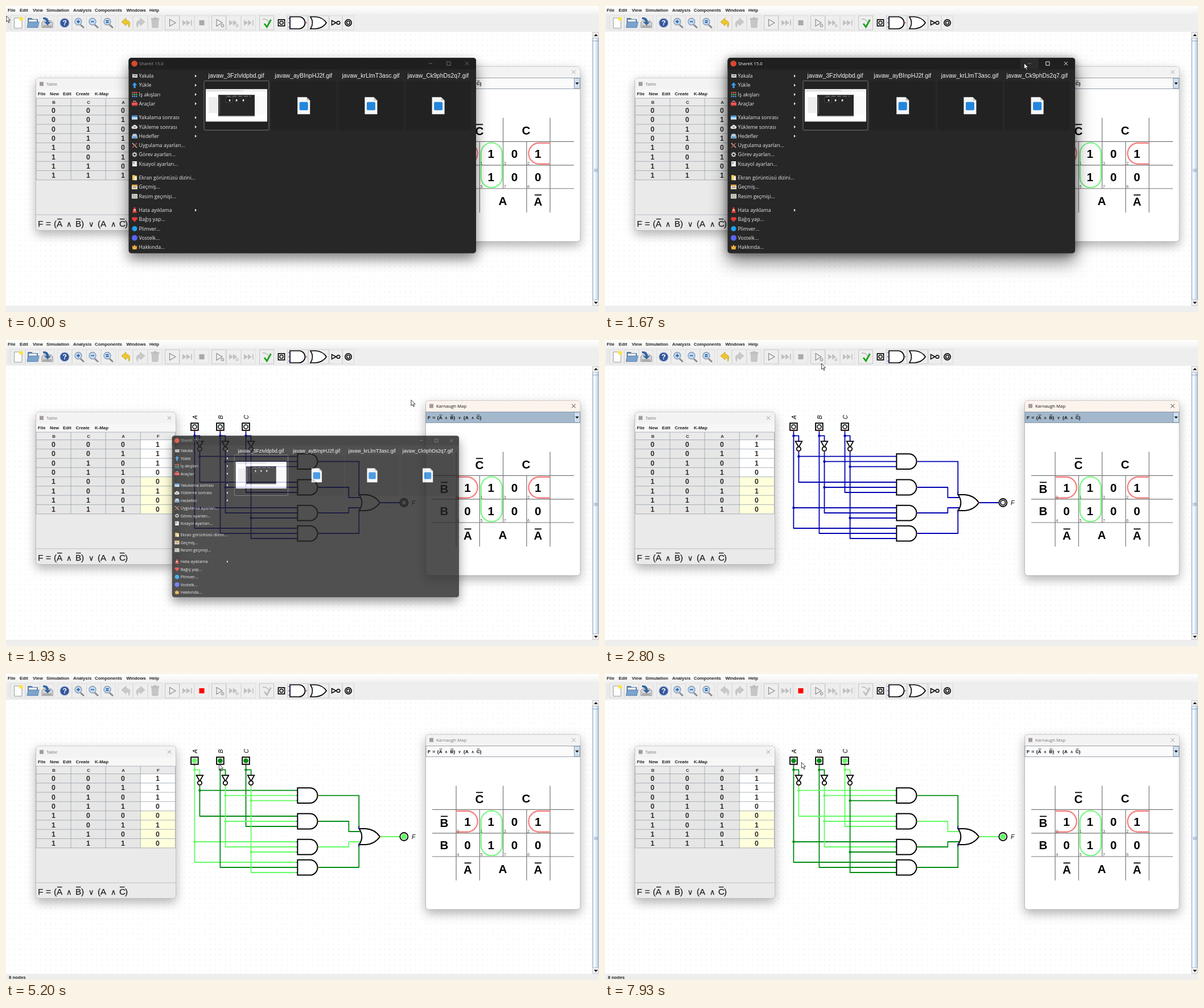
Animation, 1042 px wide and 538 px high, one loop 8 s. Source, as an HTML page:

```html
<!DOCTYPE html>
<html lang="en">
<head>
<meta charset="utf-8">
<title>Logic circuit simulation</title>
<style>
html,body{margin:0;width:100%;height:100%;overflow:hidden;background:#fff}
svg{display:block;width:100vw;height:100vh;font-family:"Liberation Sans","DejaVu Sans",sans-serif}
.b{font-weight:bold}
.u{font-family:"Open Sans","Noto Sans",sans-serif}
.m{text-anchor:middle}
.i{font-style:italic}
.win{filter:drop-shadow(0 7px 9px rgba(0,0,0,.3))}
#big .win{filter:drop-shadow(0 10px 11px rgba(0,0,0,.5))}
#big.active .win{filter:drop-shadow(0 1px 7px rgba(0,0,0,.4)) drop-shadow(0 14px 15px rgba(0,0,0,.5))}
</style>
</head>
<body>
<svg id="stage" viewBox="0 0 1042 538"></svg>
<script>
const text = (x, y, size, s, cls = '', more = '') =>
  `<text x="${x}" y="${y}" font-size="${size}" class="${cls}" ${more}>${s}</text>`;
const rect = (x, y, w, h, fill, more = '') =>
  `<rect x="${x}" y="${y}" width="${w}" height="${h}" fill="${fill}" ${more}/>`;
const path = (d, fill, stroke = 'none', w = 1, more = '') =>
  `<path d="${d}" fill="${fill}" stroke="${stroke}" stroke-width="${w}" ${more}/>`;
const line = (d, stroke, w = 1, more = '') => path(d, 'none', stroke, w, more);
const circ = (x, y, r, fill, stroke = 'none', w = 1, more = '') =>
  `<circle cx="${x}" cy="${y}" r="${r}" fill="${fill}" stroke="${stroke}" stroke-width="${w}" ${more}/>`;
const range = n => [...Array(n).keys()];
const cross = (x, y, id) => line(`M${x - 3.3} ${y - 3.3}l6.6 6.6m0-6.6l-6.6 6.6`, '#999', .9, `id="${id}"`);

// ---- main window ----
function menuBar(items, y) {
  return items.map(([x, s]) => text(x, y, 7.85, s, 'b', 'fill="#222"')).join('');
}

function toolbar() {
  const g = '#c0c0c0', blue = '#3465a4';
  const frame = (x, c, w = 25) => rect(x - w / 2, 17, w, 25, 'none', `stroke="${c}" stroke-width=".8"`);
  const zoom = (x, sign) => line(`M${x + 2} 33l6 5.5`, '#8a8a8a', 3) +
    circ(x - 2, 27.5, 6, '#c2dcf7', '#8a97a8', 1.3) + line(sign, blue, 1.8);
  const ff = x => path(`M${x - 8} 24.5l7 5-7 5zm7 0l7 5-7 5z`, g);
  let s = '';
  for (const x of [21, 47, 72, 103, 129, 154, 180, 210, 236, 262, 318, 344, 400, 426]) s += frame(x, '#dadada');
  for (const x of [292, 374, 458]) s += frame(x, '#bcbcbc');
  for (const y of range(12)) s += line(`M3 ${18 + y * 2}h5`, '#cfcfcf', .7, 'stroke-dasharray="1 1"');
  s += path('M14.5 21H28V39H14.5z', '#fdfdfd', '#9a9a9a') + circ(26.5, 22.5, 3.6, '#fbe44c');
  s += path('M38 21h7l2 2h9v14H38z', '#5b7fa8') + path('M40 24h14v8H40z', '#eee') +
    path('M37 38l2-10h19l-2 10z', '#7ba3cc', '#4a74a8', .8);
  s += path('M63 29l3-3h13l3 3v9H63z', '#d4d4d4', '#8b8b8b') + rect(65, 34, 15, 3, '#aaa') +
    path('M65 20q10-1 10 8h4l-6 6-6-6h4q0-4-6-5z', blue);
  s += circ(103, 29.7, 8.2, '#35569b', '#c0cce3', 1.3) + text(103, 34.2, 12.5, '?', 'b m', 'fill="#fff"');
  s += zoom(129, 'M124 27.5h6m-3-3v6') + zoom(154, 'M149 27.5h6') + zoom(180, 'M175.5 26h5m-5 3h5');
  s += path('M203 28l8-7v4q10 1 5 13 0-7-5-7v4z', '#efc62c', '#b99a20', .7, 'id="undo"');
  s += path('M244 28l-8-7v4q-10 1-5 13 0-7 5-7v4z', '#c9c9c9', '#b8b8b8', .7);
  s += path('M256 24h12l-1 14h-10zM255 21.5h14v2h-14zM260 20h4v2h-4z', '#c6c6c6', '#b2b2b2', .6);
  s += line('M287.5 23.5L298 29.5 287.5 35.5z', '#888', 1.1) + ff(318) + rect(325, 24.5, 1.8, 10, g);
  s += rect(339.5, 25, 9, 9, '#aaa', 'id="stop"');
  s += line('M370 23.5l10 6-10 6z', '#888', 1.1) + circ(380.5, 34.5, 2.4, '#ddd', '#888', 1);
  s += ff(400) + circ(406, 34.5, 2.2, '#ddd', g) + ff(426) + line('M434 24.5v10', g, 1.6);
  s += line('M451 23h4q5 1 7 6', '#999', 1) + line('M454 31l4.5 6 7-13', '#14a414', 2.8, 'id="check"');
  s += rect(478.5, 24, 11, 11, '#fff', 'stroke="#000" stroke-width="1.7"') + circ(484, 29.5, 3, '#eee', '#000', 1.3);
  s += frame(512.5, '#c4c4c4', 36) + path('M499 19H515A10.5 10.5 0 0 1 515 40H499z', '#fff', '#000', 1.7);
  s += line('M496 22h3m-3 7.5h3m-3 7.5h3', '#22b', 1) + line('M526 29.5h3', '#a22', 1);
  s += frame(549, '#c4c4c4', 36) + path('M535 19H544Q557 20 563 29.5 557 39 544 40H535Q542 29.5 535 19z', '#fff', '#000', 1.7);
  s += frame(579.5, '#d4d4d4', 22) + path('M572.5 25.5L580 29.5l-7.5 4z', '#fff', '#000', 1.5) + circ(584, 29.5, 2.8, '#fff', '#000', 1.5);
  s += frame(601.5, '#d4d4d4', 20) + circ(601.5, 29.5, 5.6, '#fff', '#000', 1.7) + circ(601.5, 29.5, 2.9, '#eee', '#000', 1.5);
  return s;
}

function mainWindow() {
  let s = `<defs>
    <linearGradient id="bar" x2="0" y2="1"><stop stop-color="#fff"/><stop offset="1" stop-color="#f2f2f2"/></linearGradient>
    <linearGradient id="thumb"><stop stop-color="#dde8f3"/><stop offset=".3" stop-color="#fff"/><stop offset=".6" stop-color="#dde8f3"/><stop offset="1" stop-color="#b8cfe5"/></linearGradient>
    <pattern id="dots" x="5.8" y="5.3" width="9.03" height="9.03" patternUnits="userSpaceOnUse"><rect width="1" height="1" fill="#d2d2d2"/></pattern>
  </defs>`;
  s += rect(0, 0, 1042, 538, '#fff') + rect(0, 46, 1030, 481, 'url(#dots)');
  s += rect(0, 0, 1042, 14, 'url(#bar)') + rect(0, 14, 1042, 31.5, '#eee');
  s += menuBar([[3, 'File'], [24, 'Edit'], [47, 'View'], [71, 'Simulation'], [118, 'Analysis'],
    [156, 'Components'], [211.5, 'Windows'], [252, 'Help']], 9.8);
  s += toolbar();
  s += rect(0, 527, 1042, 11, '#eee') + text(5, 535.8, 7.85, '8 nodes', 'b', 'id="status" fill="#222"');
  s += rect(1030, 46, 12, 481, '#eee') + rect(1031, 56.5, 10, 460, 'url(#thumb)', 'stroke="#7a93b5" stroke-width=".8"');
  for (const y of [46.5, 516.5]) s += rect(1031, y, 10, 10, '#f4f4f4', 'stroke="#aab" stroke-width=".6"');
  s += path('M1033 53h7l-3.5-4zM1033 520h7l-3.5 4z', '#222');
  return s + line('M1031 61.5h10M1033 287h7m-7 2h7m-7 2h7', '#7a93b5', .8);
}

// ---- circuit: lower case nets are the inverted inputs ----
const nets = {
  A: 'M331.4 160V331H512M331.4 295H512M331.4 168.4H340.4V178',
  B: 'M376.4 160V340H512M376.4 168.4H385.5V178',
  C: 'M421.5 160V268H512M421.5 168.4H430.6V178',
  a: 'M340.4 196V250H512M340.4 204.7H512',
  b: 'M385.5 196V304H512M385.5 213.7H512M385.5 259H512',
  c: 'M430.6 196V349H512M430.6 222.7H512M430.6 313H512',
  p: 'M548 213.7H620.2V272',
  q: 'M548 259H602.3V277H622',
  r: 'M548 304H602.3V295H622',
  s: 'M548 340H620.2V300',
  F: 'M657 286H692'
};
const joints = {
  A: [[331.4, 168.4], [331.4, 295]], B: [[376.4, 168.4]], C: [[421.5, 168.4]],
  a: [[340.4, 204.7]], b: [[385.5, 213.7], [385.5, 259]], c: [[430.6, 222.7], [430.6, 313]]
};

function circuit() {
  let s = '';
  for (const k in nets) {
    s += `<g id="net${k}" color="#0000b2">` + line(nets[k], 'currentColor', 1.8, 'stroke-linejoin="round"') +
      (joints[k] || []).map(([x, y]) => circ(x, y, 2.2, 'currentColor')).join('') + '</g>';
  }
  [['A', 331.4], ['B', 376.4], ['C', 421.5]].forEach(([k, x]) => {
    s += rect(x - 6.3, 146.2, 12.6, 12.6, '#fff', 'stroke="#000" stroke-width="1.9"');
    s += circ(x, 152.5, 3.6, '#eee', '#000', 1.5, `id="in${k}"`) + circ(x, 160.5, 1, '#b22');
    s += text(x + 4.2, 139.3, 10.5, k, 'i', `transform="rotate(-90 ${x + 4.2} 139.3)"`);
    s += path(`M${x + 3.2} 178.2h11.6l-5.8 10.2z`, '#fff', '#000', 1.8) + circ(x + 9, 191.5, 3.7, '#fff', '#000', 1.8);
    s += circ(x + 9, 196, .9, '#b22');
  });
  for (const y of [213.6, 259, 304.2, 340.2]) {
    s += path(`M512.3 ${y - 13.4}H534A13.4 13.4 0 0 1 534 ${y + 13.4}H512.3z`, '#fff', '#000', 2);
    s += circ(548, y, 1, '#b22') + [-9, 0, 9].map(d => circ(511.5, y + d, 1, '#118')).join('');
  }
  s += path('M620.5 272H632Q648 273 657 286 648 299 632 300H620.5Q630 286 620.5 272z', '#fff', '#000', 2);
  s += line('M620.2 267v6m0 25v6', '#118', 1.8) + circ(657, 286, 1, '#b22');
  s += circ(699.3, 286, 7, '#fff', '#000', 1.8) + circ(699.3, 286, 4.2, '#eee', '#000', 1.6, 'id="outF"');
  return s + text(713, 290, 10.5, 'F', 'i');
}

// ---- the two analysis windows ----
const terms = [[0, 'F'], [14, '='], [28, '('], [33, 'A', 1], [50, '∧'], [66, 'B', 1], [76, ')'],
  [89, '∨'], [105, '('], [110, 'A'], [128, '∧'], [143, 'C', 1], [153, ')']];

function formula(x, y, k, size, cls) {
  return terms.map(([dx, s, bar]) => {
    const px = x + dx * k, op = '∧∨'.includes(s);
    return text(px, y, op ? size * .85 : size, s, op ? '' : cls, 'fill="#222" stroke="#222" stroke-width=".25"') +
      (bar ? line(`M${px + k} ${y - size * .89}h${8.5 * k}`, '#222', 1.5 * k) : '');
  }).join('');
}

function tableWindow() {
  const bits = n => [n >> 2 & 1, n >> 1 & 1, n & 1], out = '11100100', row = 16.28, top = 175.5;
  let s = rect(52.5, 126.5, 246, 268, '#eaeaea', 'rx="5" class="win" stroke="#b5b5b5" stroke-width=".7"');
  s += path('M53 147V131.5q0-4.7 5-4.7H293q5 0 5 4.7V147z', '#f3f3f3') + rect(53, 147, 245, 15, '#f7f7f7');
  s += rect(59, 133.5, 7, 7, '#a59a9c') + text(71, 140, 7.8, 'Table', 'u', 'fill="#777"') + cross(287, 137, 'x1');
  s += menuBar([[56, 'File'], [77, 'New'], [100, 'Edit'], [122.5, 'Create'], [156, 'K-Map']], 157);
  s += rect(53, 162, 244.5, 13.5, '#eaeaea') + rect(53, top, 183, row * 8, '#e6e6e6') +
    rect(236, top, 61.5, row * 4, '#fff') + rect(236, top + row * 4, 61.5, row * 4, '#ffffdc');
  s += line(range(9).map(i => `M53 ${top + i * row}H297.5`).join('') + 'M53 162H297.5' +
    range(5).map(i => `M${53 + i * 61.1} 162V${top + row * 8}`).join(''), '#98a2ad', .8);
  [...'BCAF'].forEach((c, i) => { s += text(84 + i * 61.1, 172, 7.85, c, 'b m', 'fill="#333"'); });
  for (const n of range(8)) {
    [...bits(n), out[n]].forEach((v, i) => {
      s += text(83.5 + i * 61, top + row * n + 12.7, 12.3, v, 'b m', 'fill="#2b2b2b"');
    });
  }
  return s + line('M53 367H298', '#a9b2bb', .8) + formula(56, 388.2, 1, 15.3, '');
}

function mapWindow() {
  const big = (x, y, s, bar) => text(x, y, 20.5, s, 'b m') +
    (bar ? line(`M${x - 6} ${y - 18.7}h12`, '#000', 1.8) : '');
  let s = rect(737.5, 106.5, 271.5, 307.5, '#fff', 'rx="5" class="win" stroke="#aaa" stroke-width=".7"');
  s += path('M738 126V111.5q0-4.7 5-4.7H1003.5q5 0 5 4.7V126z', '#f3f3f3', 'none', 1, 'id="mapBar"');
  s += rect(744, 112.5, 7, 7, '#a59a9c') + text(756, 119.2, 7.75, 'Karnaugh Map', 'u', 'id="mapName"') + cross(997.5, 116, 'x2');
  s += rect(738, 126.5, 270.5, 19, '#fff', 'id="combo" stroke="#7a8a99" stroke-width=".8"') + formula(741, 139, .6, 7.9, 'b');
  s += rect(998.5, 127, 10, 18, '#cfdfef', 'stroke="#7a8a99" stroke-width=".8"') + path('M1000.3 134.5h6.4l-3.2 3.8z', '#111');
  s += line('M749 238.4H998M749 279.8H998M749 321H998M791 196.5V363M832.2 238V363M873.5 196.5V321M914.8 238V363M956 196.5V363', '#777', 1.2);
  s += line('M791 240.8H811.5A18.5 18.5 0 0 1 811.5 277.7H791M956 240.8H935.5A18.5 18.5 0 0 0 935.5 277.7H956', '#f77b7b', 2.2);
  s += rect(834.7, 240.5, 37, 79, 'none', 'rx="18.5" stroke="#72fa7e" stroke-width="2.2"');
  s += big(832, 227, 'C', 1) + big(914, 225.5, 'C') + big(770, 269, 'B', 1) + big(770, 308.3, 'B') +
    big(811.5, 351, 'A', 1) + big(873, 349.8, 'A') + big(935, 351, 'A', 1);
  [...'11010100'].forEach((v, i) => {
    const x = 811 + i % 4 * 41.2, r = i >> 2;
    s += big(x, 267 + r * 41.3, v) + text(x - 18.7, 278.5 + r * 41.3, 7.2, '01324576'[i], '', 'fill="#555"');
  });
  return s;
}

// ---- capture tool window ----
function icon(kind, y) {
  const x = 226, at = d => `M${x} ${y}${d}`;
  return {
    shot: () => rect(x - 4, y - 3, 9, 6, '#ccc') + line(`M${x - 5} ${y - 3.5}h4m-1 3h5`, '#555', 1),
    up: () => path(at('m0-5l4.5 5h-2.8v5h-3.4v-5h-2.8z'), '#3f9be8'),
    grid: () => range(9).map(i => rect(x - 4.5 + i % 3 * 3.4, y - 4.5 + (i / 3 | 0) * 3.4, 2.3, 2.3, ['#e55', '#5b5', '#59e'][i / 3 | 0])).join(''),
    box: () => rect(x - 5, y - 3, 10, 7, '#cf3030', 'rx="1"') + rect(x - 5, y, 10, 1, '#fbb') + line(`M${x - 2} ${y - 3}v-1.5h4v1.5`, '#ccc'),
    card: () => rect(x - 5, y - 3.5, 10, 7, '#bcdcf4') + rect(x - 5, y - 3.5, 10, 2.5, '#3f8fd6'),
    cloud: () => path(at('m-3 3.5a2.5 2.5 0 0 1 0-5 3.2 3.2 0 0 1 6-.5 2.8 2.8 0 0 1 0 5.5z'), '#ddd') + path(at('m0-1l2 2h-4z'), '#456'),
    disk: () => path(at('m-3-4h6l2 5v3h-10v-3z'), '#b9cbdc') + rect(x - 4, y + 1, 8, 2, '#3f8fd6'),
    tools: () => line(at('m-4-4l8 8'), '#bbb', 1.6) + line(at('m4-4l-8 8'), '#c6563f', 1.6),
    gear: () => circ(x, y, 2.7, 'none', '#ccc', 1.8) + line(at('m0-4.5v2m0 5v2m-4.5-4.5h2m5 0h2m-7.7-3.2l1.4 1.4m3.6 3.6l1.4 1.4m0-6.4l-1.4 1.4m-3.6 3.6l-1.4 1.4'), '#ccc', 1.2),
    page: () => rect(x - 4, y - 4.5, 8, 9, '#eee') + rect(x - 3, y - 3, 3, 3, '#999'),
    folder: () => path(at('m-4-4.5h4l1 1h3v8h-8z'), '#f0cb5c') + rect(x, y - 1.5, 4, 6, '#eee'),
    past: () => rect(x - 5, y - 4, 10, 8, '#eadfca') + rect(x - 5, y - 4, 10, 2.5, '#e0a23d') + rect(x - 3, y, 6, 1.3, '#777'),
    pics: () => rect(x - 5, y - 4, 10, 8, '#e6e6dc') + rect(x - 4, y - 2.5, 3.5, 2.5, '#7ab') + rect(x + .5, y - 2.5, 3.5, 2.5, '#ba7') + rect(x - 4, y + 1, 8, 1.4, '#999'),
    cone: () => path(at('m-1-5h2l3 9.5h-8z'), '#e5493a') + rect(x - 2, y - 1, 4, 1.5, '#fff'),
    heart: () => path(at('m0 4.5l-4.3-4.5a2.6 2.6 0 0 1 4.3-3 2.6 2.6 0 0 1 4.3 3z'), '#e23b3b'),
    sky: () => circ(x, y, 4.5, '#1da1f2'),
    violet: () => circ(x, y, 5, '#5865f2'),
    crown: () => path(at('m-4.5-3l2.3 2 2.2-3.5 2.2 3.5 2.3-2-1 7h-7z'), '#efae3f')
  }[kind]();
}

const entries = [
  [122.8, 'shot', 'Yakala', 1], [139, 'up', 'Yükle', 1], [155.3, 'grid', 'İş akışları', 1], [171.5, 'box', 'Araçlar', 1],
  [196, 'card', 'Yakalama sonrası', 1], [212.3, 'cloud', 'Yükleme sonrası', 1], [228.5, 'disk', 'Hedefler', 1],
  [244.8, 'tools', 'Uygulama ayarları...'], [261, 'gear', 'Görev ayarları...'], [277.3, 'page', 'Kısayol ayarları...'],
  [301.5, 'folder', 'Ekran görüntüsü dizini...'], [318, 'past', 'Geçmiş...'], [334.3, 'pics', 'Resim geçmişi...'],
  [358.7, 'cone', 'Hata ayıklama', 1], [375, 'heart', 'Bağış yap...'], [391.3, 'sky', 'Plimver...'],
  [407.6, 'violet', 'Vostelk...'], [423.8, 'crown', 'Hakkında...']
];

function captureWindow() {
  let s = rect(215.5, 91, 610.5, 343.5, '#272727', 'rx="5" class="win"');
  s += path('M215.5 111.3V96q0-5 5-5H821q5 0 5 5V111.3z', '#1f1f1f') + rect(730, 91.5, 32, 19.5, '#2b2b2b', 'id="hover"');
  s += circ(225.7, 101, 5.3, '#d9482f') + text(234, 104, 7.8, 'ShareX 15.0', 'u', 'id="capName"');
  s += line('M742.7 101h6.6', '#777', .9, 'id="minBtn"') + line('M774.7 97.8h6.3v6.3h-6.3zM806.7 97.8l6.3 6.3m0-6.3l-6.3 6.3', '#777', .9, 'id="capBtns"');
  for (const y of [183.8, 289.5, 346.5]) s += line(`M220 ${y}H338`, '#2e2e2e', .8);
  for (const [y, kind, label, sub] of entries) {
    s += icon(kind, y) + text(233.5, y + 3.1, 8.8, label, 'u', 'fill="#e9e9e9"');
    if (sub) s += path(`M332 ${y - 2.5}l3 2.5-3 2.5z`, '#eee');
  }
  ['javaw_3FzIvldpbd.gif', 'javaw_ayBInpHJ2f.gif', 'javaw_krLlmT3asc.gif', 'javaw_Ck9phDs2q7.gif'].forEach((name, i) => {
    const x = 405 + i * 118.2;
    s += text(x - .4, 126.3, 10.5, name, 'm', 'fill="#f4f4f4"');
    s += rect(x - 57, 131.5, 114, 86.5, '#222', i ? 'rx="2"' : 'rx="2" stroke="#8c8c8c" stroke-width=".8"');
    if (i) s += path(`M${x - 11} 160h16l6 6v24h-22z`, '#f6f6f6') + path(`M${x + 5} 160v6h6z`, '#c9c9c9') + rect(x - 7.5, 168.5, 15, 14.5, '#2386dc', 'rx="2"');
  });
  // small picture of the whole screen
  s += rect(351, 146, 108, 57, '#fff') + rect(351, 146, 108, 4.5, '#f0f0f0') + line('M352 148.7h64', '#bbb', 1.3, 'stroke-dasharray="2 1"');
  s += rect(356, 160, 20, 28, '#eee') + rect(434, 158, 22, 33, '#fafafa') + rect(373, 192, 64, 3, '#d2d2d2') + rect(373, 156, 64, 37, '#272727');
  s += rect(386, 160, 12, 9, '#1e1e1e', 'stroke="#777" stroke-width=".4"');
  for (const x of [393, 405, 417]) s += rect(x - 1.2, 164, 2.5, 3.3, '#eee');
  return s + line('M375 160v30', '#777', 2, 'stroke-dasharray="1 1"') + line('M388 158.5h42', '#aaa', .8, 'stroke-dasharray="7 3"');
}

const stage = document.getElementById('stage');
stage.innerHTML = mainWindow() + `<g id="logic">${circuit()}</g>` + tableWindow() + mapWindow() +
  `<g id="big">${captureWindow()}</g>` +
  `<g id="mouse">${path('M.4.4V10.6L2.8 8.5 4.5 12.4 6.1 11.7 4.5 7.9H7.6z', '#fff', '#111', .8)}</g>`;
const el = {};
stage.querySelectorAll('[id]').forEach(e => { el[e.id] = e; });
const set = (id, key, v) => el[id].setAttribute(key, v);

// ---- motion: time, x, y of the pointer ----
const track = [[0, 0, 17], [267, 0, 17], [1000, 748, 105], [1133, 736, 100], [1733, 736, 100], [1867, 735, 99],
  [2267, 413, 183], [2400, 413, 183], [2800, 380, 41], [3133, 281, 31], [3333, 281, 31], [3933, 330, 153],
  [4733, 330, 153], [5200, 374, 158], [5400, 374, 158], [5733, 407, 148], [5867, 407, 148], [6200, 360, 150],
  [6333, 371, 152], [6533, 371, 152], [6867, 328, 152], [6933, 328, 152], [7333, 417, 152], [7400, 417, 152],
  [7933, 345, 155], [8000, 345, 155]];

function pointer(t) {
  const i = Math.max(1, track.findIndex(p => p[0] > t));
  const [a, b] = [track[i - 1], track[i]];
  const u = (t - a[0]) / (b[0] - a[0]), e = u * u * (3 - 2 * u);
  return [a[1] + (b[1] - a[1]) * e, a[2] + (b[2] - a[2]) * e];
}

function render(t) {
  const between = (a, b) => t > a - 5 && t < b - 5;
  const sim = t > 3395, A = between(4200, 6867), B = between(5400, 6533), C = t > 7395;
  const v = { A, B, C, a: !A, b: !B, c: !C };
  v.p = v.a && v.b && v.c;
  v.q = v.a && v.b && C;
  v.r = A && v.b && v.c;
  v.s = A && B && v.c;
  v.F = v.p || v.q || v.r || v.s;
  const tint = on => on ? '#62fc62' : '#008b12';
  for (const k in nets) set('net' + k, 'color', sim ? tint(v[k]) : '#0000b2');
  for (const k of ['inA', 'inB', 'inC', 'outF']) {
    const c = tint(v[k[k.length - 1]]);
    set(k, 'fill', sim ? c : '#eee');
    set(k, 'stroke', sim ? c : '#000');
  }
  set('status', 'visibility', sim ? 'visible' : 'hidden');
  set('undo', 'fill', sim ? '#c9c9c9' : '#efc62c');
  set('undo', 'stroke', sim ? '#b8b8b8' : '#b99a20');
  set('stop', 'fill', sim ? '#f00' : '#aaa');
  set('check', 'stroke', sim ? '#bdbdbd' : '#14a414');

  const focus = between(1800, 3267);
  set('mapBar', 'fill', between(1933, 3267) ? '#fcf3ec' : focus ? '#fdfdfd' : '#f3f3f3');
  set('mapName', 'fill', focus ? '#111' : '#777');
  set('combo', 'fill', focus ? '#a3b8cc' : '#fbfbfb');
  set('x2', 'stroke', focus ? '#222' : '#999');

  const active = between(1667, 1800);
  set('big', 'class', active ? 'active' : '');
  set('capName', 'fill', active ? '#fff' : '#999');
  set('capBtns', 'stroke', active ? '#fff' : '#777');
  set('minBtn', 'stroke', between(1133, 1667) ? '#fff' : '#777');
  set('hover', 'opacity', between(1133, 1800) ? 1 : 0);
  // minimise: shrink, sink and fade
  const p = Math.min(1, Math.max(0, (t - 1760) / 310)) ** 1.43;
  set('big', 'transform', `translate(${521 + 53 * p} ${262.9 + 109 * p}) scale(${1 - .4 * p}) translate(-521 -262.7)`);
  set('big', 'opacity', Math.min(1, (1 - p) / .7));
  el.big.style.display = p < 1 ? '' : 'none';

  set('mouse', 'transform', `translate(${pointer(t).map(n => Math.round(n * 2) / 2)})`);
}

// the picture advances 15 times per second
const start = performance.now();
function tick() {
  const t = (performance.now() - start) % 8000;
  render(Math.floor((t + 4) * .015) % 120 * 200 / 3);
  requestAnimationFrame(tick);
}
tick();
</script>
</body>
</html>
```
